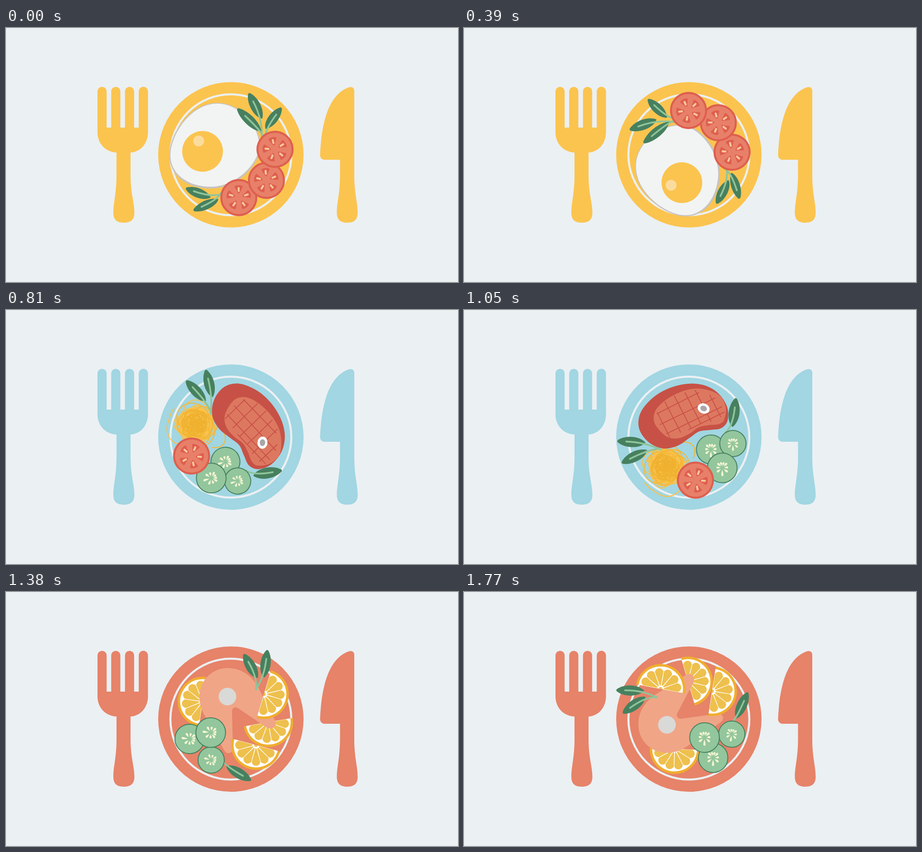
These frames come from a looping animation (998x561 px, 1800 ms). An HTML page:

```html
<!DOCTYPE html>
<html lang="en">
<head>
<meta charset="utf-8">
<title>Spinning plates</title>
<style>
html, body { margin: 0; width: 100%; height: 100%; overflow: hidden; background: #ebf0f3; }
svg { display: block; width: 100vw; height: 100vh; }
</style>
</head>
<body>
<svg id="stage" viewBox="0 0 998 561">
  <g id="tableware">
    <path d="M202 140a10.1 10.1 0 0 1 20.2 0V220H232.3V140a10.1 10.1 0 0 1 20.2 0V220H262.7V140a10.1 10.1 0 0 1 20.2 0V220H293.1V140a10.2 10.2 0 0 1 20.4 0V230C313.5 256 296 274 275 275V325C275 366 283.5 385 283.5 408C283.5 424 275 430 260 430S237 424 237 408C237 385 244 366 244 325V275C220 274 202 256 202 230Z"/>
    <path d="M769 139V325C769 366 776.5 385 776.5 408C776.5 424 768 430 753.5 430S730.5 424 730.5 408C730.5 385 737.5 366 737.5 325V291H704C697 291 693 286 693.5 279C697 200 716 145 757 131C764 129 769 132 769 139Z"/>
    <g id="plate">
      <circle cx="496.5" cy="280" r="160.5"/>
      <circle cx="496.5" cy="280" r="133.5" fill="none" stroke="#ebf0f3" stroke-width="4.5"/>
    </g>
  </g>
  <g id="food"></g>
</svg>
<script>
const LOOP = 1800, STEP = 30, CX = 496.5, CY = 280.5;
const GREEN = '#47805f', LIGHT_GREEN = '#8fc49b', RED = '#de5f4f', MEAT = '#c75146';
const RAD = Math.PI / 180;
const $ = id => document.getElementById(id);

const circle = (x, y, r, fill, extra = '') =>
  `<circle cx="${x}" cy="${y}" r="${r}" fill="${fill}" ${extra}/>`;
const shape = (d, fill, extra = '') => `<path d="${d}" fill="${fill}" ${extra}/>`;
const line = (d, color, width) =>
  `<path d="${d}" fill="none" stroke="${color}" stroke-width="${width}" stroke-linecap="round"/>`;
const place = (x, y, angle, body) =>
  `<g transform="translate(${x} ${y}) rotate(${angle})">${body}</g>`;
const spokes = (angles, body) => angles.map(a => place(0, 0, a, body)).join('');

// Smooth closed curve through the points.
function blob(pts) {
  const n = pts.length, at = i => pts[(i + n) % n];
  let d = `M${pts[0]}`;
  for (let i = 0; i < n; i++) {
    const [a, b, c, e] = [at(i - 1), at(i), at(i + 1), at(i + 2)];
    d += `C${b.map((v, k) => v + (c[k] - a[k]) / 6)} ${c.map((v, k) => v - (e[k] - b[k]) / 6)} ${c}`;
  }
  return d + 'Z';
}

function leaf(tip, base, end, half = 14) {
  const dx = tip[0] - base[0], dy = tip[1] - base[1], len = Math.hypot(dx, dy);
  const body = `M0 0C${len * .15} ${-half} ${len * .68} ${-half - 2} ${len - 2} -3` +
    `Q${len + 2} 0 ${len - 2} 3C${len * .7} ${half} ${len * .25} ${half} 0 0Z`;
  const vein = [base[0] + dx * .68, base[1] + dy * .68];
  return place(base[0], base[1], Math.atan2(dy, dx) / RAD, shape(body, GREEN)) +
    line(`M${vein}Q${base} ${end}`, LIGHT_GREEN, 3.8);
}

function tomato(x, y, angle) {
  const cell = shape('M11 0L24 -7Q27 0 24 7Z', RED, `stroke="${RED}" stroke-width="4" stroke-linejoin="round"`) +
    line('M14.5 0H21', '#f8c898', 4.4);
  return place(x, y, angle, circle(0, 0, 38.7, '#e88069', `stroke="${RED}" stroke-width="4.4"`) +
    spokes([0, 72, 144, 216, 288], cell));
}

function cucumber(x, y, r, angle) {
  const drop = (from, to) => shape(
    `M${from} 0C${from + 4} -1 ${to - 3} -3.4 ${to} -1.8Q${to + 1.5} 0 ${to} 1.8C${to - 3} 3.4 ${from + 4} 1 ${from} 0Z`, '#f4f5d3');
  const k = r / 33;
  return place(x, y, angle, circle(0, 0, r - 1, '#93c69c', `stroke="${GREEN}" stroke-width="2"`) +
    `<g transform="scale(${k})">` + spokes([0], drop(4, 17)) +
    spokes([52, -52, 135, -135], drop(4, 14)) + spokes([95, -95, 165, -165], drop(4, 12)) + '</g>');
}

function lemon(x, y, angle) {
  const half = (r, fill) => shape(`M0 ${-r}A${r} ${r} 0 0 1 0 ${r}Z`, fill);
  const cell = shape('M9 0L38 -8Q44 -6 44.5 0Q44 6 38 8Z', '#eec04d',
    'stroke="#eec04d" stroke-width="3" stroke-linejoin="round"');
  return place(x, y, angle, half(55, '#f0ae2e') + half(49.5, '#fff') +
    spokes([-75, -45, -15, 15, 45, 75], cell) + shape('M0 -4A4 4 0 0 1 0 4Z', '#eec04d'));
}

function pasta(x, y) {
  let seed = 7;
  const rnd = () => (seed = seed * 16807 % 2147483647) / 2147483647;
  const loops = (count, spread, min, max, color) => {
    let out = '';
    for (let i = 0; i < count; i++) {
      const a = rnd() * 2 * Math.PI, d = spread * Math.sqrt(rnd());
      const rx = min + rnd() * (max - min), ry = rx * (.65 + rnd() * .3);
      out += `<ellipse rx="${rx}" ry="${ry}" fill="none" stroke="${color}" stroke-width="2"
        transform="translate(${x + d * Math.cos(a)} ${y + d * Math.sin(a)}) rotate(${rnd() * 180})"/>`;
    }
    return out;
  };
  return circle(x, y, 38, '#fbc44f') + loops(26, 25, 18, 32, '#f9c14b') +
    loops(9, 17, 26, 36, '#f2b738') + loops(26, 17, 7, 20, '#efb12f') +
    line('M433 187C428 160 445 143 470 141Q486 137 500 140', '#f9c14b', 2.2) +
    line('M458 253Q466 277 486 272Q505 264 507 245', '#f2b738', 2.2);
}

function eggDish() {
  return shape('M360.5 281C360.5 235 405 165.3 467 165.3C515 165.3 561.5 214 561.5 262C561.5 300 512 354.5 452 354.5C395 354.5 360.5 322 360.5 281Z', '#c8c3bf') +
    shape('M363 281C363 238 406 167 467 167C513 167 559 214 559 260C559 297 510 350.5 452 350.5C398 350.5 363 320 363 281Z', '#f1f4f3') +
    circle(434, 272.5, 45, '#fbc44f') + circle(425.5, 249.5, 12, '#fcdc9e') +
    leaf([536, 144], [566, 200], [565, 240]) +
    leaf([511, 178], [564, 228], [568, 240], 13) +
    leaf([608, 176], [573, 223], [573, 238], 13) +
    leaf([397, 354], [452, 374], [476, 367], 13) +
    leaf([414, 403], [469, 378], [475, 364], 12) +
    tomato(514, 374.5, -91) + tomato(575, 336.5, -95) + tomato(594, 268, -104);
}

function steakDish() {
  const outer = [[555, 212], [590, 220], [611, 247], [614, 288], [603, 327], [580, 363], [550, 387],
    [515, 395.5], [480, 387], [458, 365], [457, 343], [472, 324], [488, 305], [494, 280], [502, 249], [522, 223]];
  const inner = [[546, 247], [575, 253], [590, 273], [590, 303], [579, 338], [560, 367], [536, 385],
    [507, 394], [481, 384], [465, 362], [467, 346], [482, 329], [495, 311], [500, 288], [510, 265], [526, 251]];
  const grill = 'M528 252L584 273M517 276L588 302M507 298L582 326M497 320L569 347M484 339L556 366M475 361L525 380' +
    'M583 271L547 367M562 258L512 383M538 252L488 379M508 292L476 374';
  const bone = '<ellipse rx="13.5" ry="11" fill="#fff"/><ellipse rx="7.5" ry="6" fill="#aaa5a9"/>';
  return pasta(489, 199) +
    leaf([567, 138], [545, 197], [528, 217]) +
    leaf([607, 167], [559, 207], [524, 218]) +
    leaf([478, 414], [440, 362], [444, 342], 15) +
    shape(blob(outer), MEAT) + shape(blob(inner), '#dd7860') + line(grill, MEAT, 1.9) +
    place(515, 349, -20, bone) +
    cucumber(442, 293, 33, 227) + cucumber(415, 335.5, 30, 227) + cucumber(396, 280, 33.8, 227) +
    tomato(421.5, 220, -74);
}

function fishDish() {
  return lemon(434, 242, 188) + lemon(579, 287.5, 80) +
    shape('M489 168C520 168 543 185 557 211L594 284C600 297 588 306 575 299L513 257C506 252 499 256 499 264L501 345C500 357 488 360 482 350L436 268C430 255 427 245 427 231C427 196 455 168 489 168Z', '#f0a586') +
    circle(489, 231, 19.5, '#d9d9d7') +
    lemon(569.4, 225.6, 16.7) + lemon(552, 338, 105) +
    leaf([525, 137], [556, 190], [552, 216]) +
    leaf([577, 128], [570, 189], [552, 214]) +
    leaf([541, 416], [486, 385], [476, 371], 14) +
    cucumber(405.5, 324.5, 33.5, 187) + cucumber(453, 371, 30, 195) + cucumber(452, 310.5, 33.8, 187);
}

// pose: step at which the dish is drawn unrotated; gain: its spin speed factor
const dishes = [
  { until: 19, color: '#fbc44f', drop: 0, pose: 0, gain: 1.015, art: eggDish },
  { until: 39, color: '#a1d6e2', drop: .7, pose: 19, gain: 1.003, art: steakDish },
  { until: 60, color: '#e68369', drop: .7, pose: 46, gain: .984, art: fishDish }
];
for (const dish of dishes) {
  dish.node = document.createElementNS('http://www.w3.org/2000/svg', 'g');
  dish.node.innerHTML = dish.art();
  $('food').append(dish.node);
}

// Degrees turned after n steps: a steady spin with a slow swell.
const spin = n => 7.75 * n + 15 * Math.sin(2 * Math.PI * (n / 60 - .6));

const start = performance.now();
function draw() {
  const n = Math.floor((performance.now() - start) % LOOP / STEP);
  const now = dishes.find(d => n < d.until);
  for (const d of dishes) d.node.setAttribute('display', d === now ? 'inline' : 'none');
  $('tableware').setAttribute('fill', now.color);
  $('plate').setAttribute('transform', `translate(0 ${now.drop})`);
  const angle = -now.gain * (spin(n) - spin(now.pose));
  now.node.setAttribute('transform', `rotate(${angle} ${CX} ${CY})`);
  requestAnimationFrame(draw);
}
draw();
</script>
</body>
</html>
```
